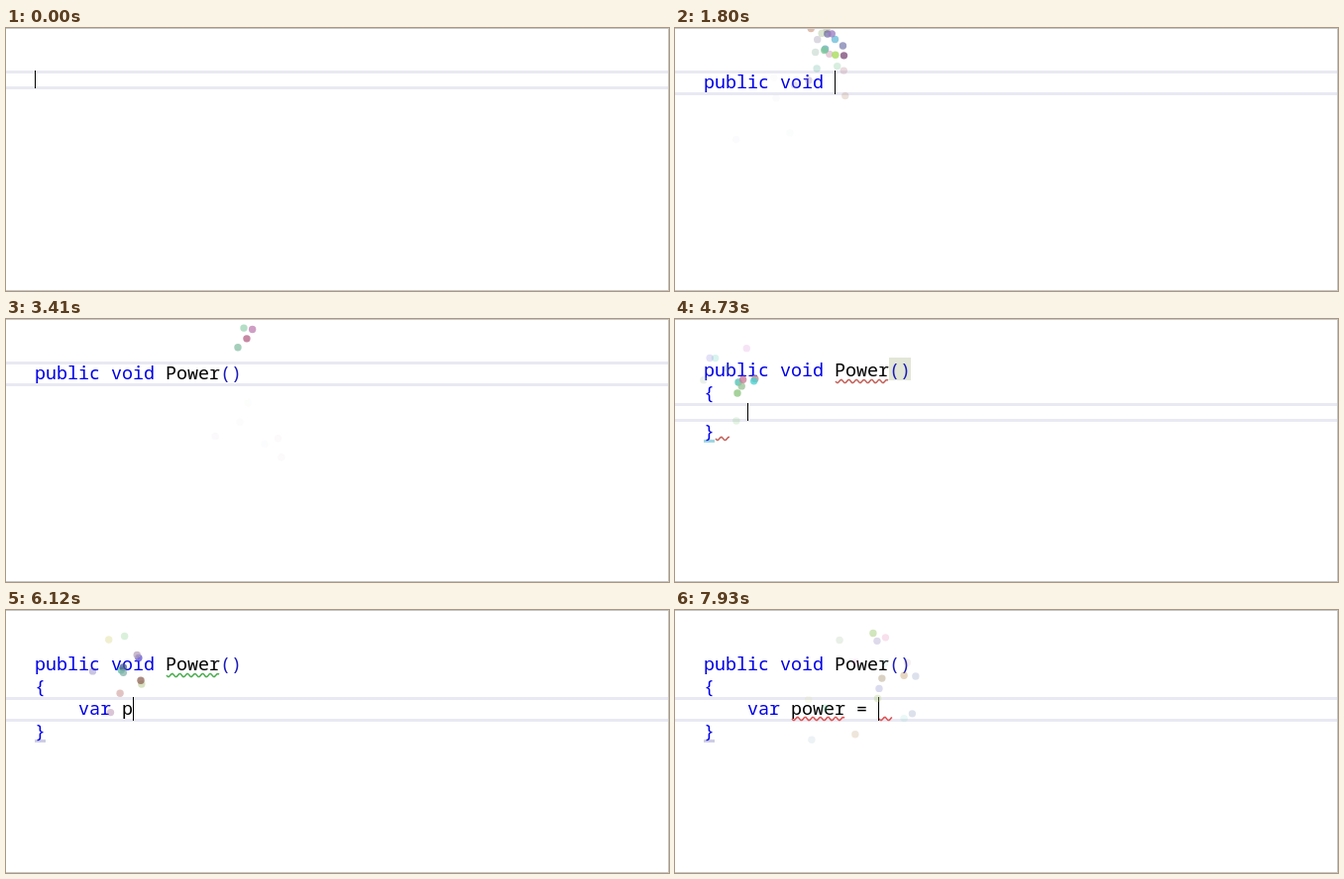
Recreate the animation shown at these times as an HTML page with a canvas. Size 669 by 266 pixels, loop 8000 ms.

```html
<!DOCTYPE html>
<html lang="en">
<head>
<meta charset="utf-8">
<title>Typing with sparks</title>
<style>
html, body { margin: 0; width: 100%; height: 100%; overflow: hidden; background: #fff; }
canvas { display: block; }
</style>
</head>
<body>
<canvas id="stage" width="669" height="266"></canvas>
<script>
const ctx = document.getElementById("stage").getContext("2d");
const W = 669, H = 266, LOOP = 8000;
const LEFT = 29, TOP = 43, CHAR = 11, ROW = 22.6, EMPTY_ROW = 16.6;
const FONT = "18.333px 'Noto Sans Mono', 'DejaVu Sans Mono', monospace";
const LIFE = 0.63, GRAVITY = 1300, SPARKS = 6;

const SCRIPT = "public void Power()\n{\nvar power = ";
const TIMES = [
  70, 210, 350, 490, 630, 840, 1050,
  1190, 1330, 1400, 1540, 1680,
  1890, 2030, 2240, 2380, 2590, 2800, 3150,
  4030, 4240, 4620,
  4870, 5010, 5220, 5700,
  5980, 6160, 6240, 6320, 6400, 7370, 7440, 7510
];

const between = (t, a, b) => t >= a && t < b;

// Repeatable random number in 0..1
function rnd(a, b) {
  const v = Math.sin(a * 127.1 + b * 311.7 + 5.3) * 43758.5453;
  return v - Math.floor(v);
}

// Lines of code and caret after the first n keys
function layout(n) {
  const lines = SCRIPT.slice(0, n).split("\n");
  const row = lines.length - 1;
  if (row === 2) lines[2] = "    " + lines[2];
  const col = lines[row].length;
  if (row === 1 && lines[1]) lines[1] = "{}";
  if (row === 2) lines.push("}");
  const tops = [];
  let y = TOP;
  for (const line of lines) {
    tops.push(Math.round(y));
    y += line.trim() ? ROW : EMPTY_ROW;
  }
  return {
    lines, tops, row,
    x: LEFT + (row === 2 && !col ? 4 : col) * CHAR,
    y: tops[row],
    h: lines[row].trim() ? 24 : 18
  };
}

const sparks = TIMES.flatMap((time, key) => {
  const caret = layout(key + 1);
  return Array.from({ length: SPARKS }, (_, i) => {
    const r = k => rnd(key * SPARKS + i, k);
    return {
      time, x: caret.x, y: caret.y + 8,
      vx: (r(1) - 0.5) * 190,
      vy: 240 + r(2) * 220,
      color: `hsl(${r(3) * 360}, ${15 + r(4) * 50}%, ${38 + r(5) * 30}%)`
    };
  });
});

function rect(color, x, y, w, h) {
  ctx.fillStyle = color;
  ctx.fillRect(x, y, w, h);
}

function squiggle(color, x, y, w) {
  ctx.strokeStyle = color;
  ctx.lineWidth = 1.5;
  ctx.beginPath();
  for (let i = 0; i <= w; i++) ctx.lineTo(x + i, y + 1.6 * Math.sin(i * 0.82));
  ctx.stroke();
}

function drawLine(line, top) {
  for (const word of line.matchAll(/\w+|[^\w\s]/g)) {
    const s = word[0];
    ctx.fillStyle = /^(p|pu|pub|publ|publi|public|void|var)$/.test(s) && !line.startsWith("    p") && !/var p$/.test(line)
      || /[{}]/.test(s) ? "#0000e8" : /[()]/.test(s) ? "#1c1cb8" : "#000";
    if (/var p$/.test(line) && s === "var") ctx.fillStyle = "#0000e8";
    [...s].forEach((c, i) => ctx.fillText(c, LEFT + (word.index + i) * CHAR, top + 18));
  }
}

function drawPopup(t) {
  if (!between(t, 140, 1660)) return;
  ctx.globalAlpha = 0.33 * (1660 - t) / 1520;
  ctx.strokeStyle = "#999";
  ctx.lineWidth = 1.5;
  ctx.beginPath();
  ctx.roundRect(5, 203.5, 23, 35.5, 3);
  ctx.stroke();
  for (let i = 0; i < 3; i++) rect("#333", 11 + i * 4, 226, 2, 2);
  ctx.globalAlpha = 1;
}

function drawSparks(t) {
  for (const p of sparks) {
    const age = (t - p.time) / 1000;
    if (!between(age, 0, LIFE)) continue;
    ctx.globalAlpha = 0.95 * (1 - age / LIFE);
    ctx.fillStyle = p.color;
    ctx.beginPath();
    ctx.arc(p.x + p.vx * age, p.y - p.vy * age + GRAVITY * age * age / 2, 3.7, 0, 7);
    ctx.fill();
  }
  ctx.globalAlpha = 1;
}

function draw(t) {
  const typed = TIMES.filter(k => k <= t).length;
  const { lines, tops, row, x, y, h } = layout(typed);
  rect("#fff", 0, 0, W, H);

  ctx.save();
  if (between(t, 4620, 4870)) ctx.translate(0, -3);
  else if (typed && t - TIMES[typed - 1] < 60) {
    ctx.translate(Math.round(rnd(typed, 8) * 4 - 2), Math.round(rnd(typed, 9) * 6 - 3));
  }

  rect("#e9e9f3", -5, y, W + 10, 3);
  rect("#e9e9f3", -5, y + h - 2, W + 10, 3);
  if (between(t, 3830, 4870)) rect("#e2e6d6", 216, tops[0] - 1, 22, 23);
  if (row === 2) rect(t < 4870 ? "#9ed6e0" : "#cdcde4", LEFT, tops[3] + 20, 11, 3);

  ctx.font = FONT;
  lines.forEach((line, i) => drawLine(line, tops[i]));

  if (between(t, 4300, 6800)) squiggle(t < 4870 ? "#c4625a" : "#4cae50", 162, tops[0] + 23, 53);
  if (between(t, 4620, 4870)) squiggle("#c4625a", 41, tops[3] + 19, 14);
  if (t >= 7600) {
    squiggle("#e05050", 118, tops[2] + 22, 53);
    squiggle("#e05050", 206, tops[2] + 22, 13);
  }
  if (!between(t, 3340, 3830) && !between(t, 7170, 7370)) rect("#000", x, y, 1, h);
  ctx.restore();

  drawPopup(t);
  drawSparks(t);
  rect("#c8c8c8", 0, 0, W, 1);
  rect("#c8c8c8", 0, H - 1, W, 1);
  rect("#c8c8c8", W - 1, 0, 1, H);
}

const start = performance.now();
function tick() {
  draw((performance.now() - start) % LOOP);
  requestAnimationFrame(tick);
}
tick();
</script>
</body>
</html>
```
